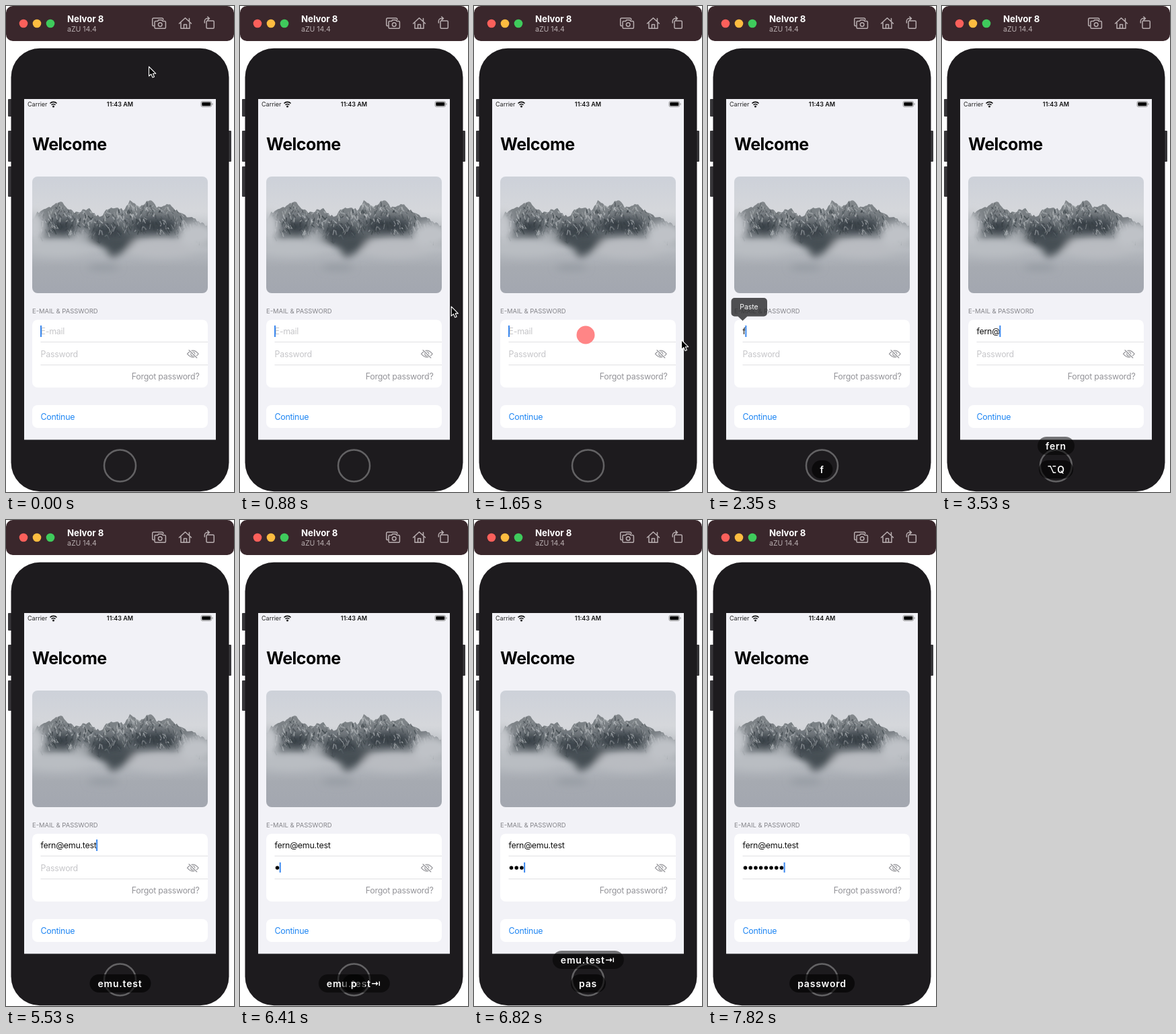
These frames come from a looping animation (339x721 px, 8000 ms). An HTML page:

```html
<!DOCTYPE html>
<html lang="en">
<head>
<meta charset="utf-8">
<title>Sign-in demo</title>
<style>
html, body { margin: 0; width: 100%; height: 100%; overflow: hidden; background: #fff; }
body { position: relative; font-family: Inter, "DejaVu Sans", sans-serif; }
svg { position: absolute; left: 0; top: 0; display: block; }
svg text { font-family: Inter, "DejaVu Sans", sans-serif; }
.row { font-size: 12.4px; letter-spacing: -.02em; }
#email {
  position: absolute; left: 51.5px; top: 474px; height: 17px; line-height: 17px;
  white-space: pre; color: #111;
}
.pill {
  position: absolute; left: 169.5px; transform: translateX(-50%);
  box-sizing: border-box; height: 27px; padding: 0 12.5px; border-radius: 13.5px;
  font-size: 14px; font-weight: 600; line-height: 27px; letter-spacing: .8px;
  white-space: pre; color: #fff;
}
#low { top: 674px; background: rgba(0,0,0,.62); }
#up { background: rgba(0,0,0,.52); }
</style>
</head>
<body>
<svg width="339" height="721" viewBox="0 0 339 721">
  <defs>
    <linearGradient id="sky" x2="0" y2="1">
      <stop offset="0" stop-color="#cdd1d9"/>
      <stop offset=".3" stop-color="#d5d7db"/>
      <stop offset=".58" stop-color="#bbbfc4"/>
      <stop offset=".78" stop-color="#a6aab1"/>
      <stop offset="1" stop-color="#a3a7b0"/>
    </linearGradient>
    <linearGradient id="rock" gradientUnits="userSpaceOnUse" x1="0" y1="288" x2="0" y2="362">
      <stop offset="0" stop-color="#84898d"/>
      <stop offset=".45" stop-color="#71777c"/>
      <stop offset=".75" stop-color="#6b7277"/>
      <stop offset="1" stop-color="#a5aaaf" stop-opacity="0"/>
    </linearGradient>
    <clipPath id="photo"><rect x="39" y="253" width="261" height="173" rx="8"/></clipPath>
    <clipPath id="ridgeClip"><use href="#ridge"/></clipPath>
    <filter id="soft" x="-60%" y="-90%" width="220%" height="280%"><feGaussianBlur stdDeviation="6"/></filter>
  </defs>

  <!-- Window bar -->
  <rect width="339" height="52" rx="10" fill="#3a272c"/>
  <circle cx="26" cy="26" r="6.3" fill="#fc605b"/>
  <circle cx="46" cy="26" r="6.3" fill="#fdbc40"/>
  <circle cx="66" cy="26" r="6.3" fill="#3fcb5c"/>
  <text x="91" y="24" font-size="13.2" font-weight="700" fill="#fff">Nelvor 8</text>
  <text x="91" y="38" font-size="10.5" fill="#b9afb1">aZU 14.4</text>
  <g fill="none" stroke="#b8aeb0" stroke-width="1.5" stroke-linejoin="round" stroke-linecap="round">
    <path d="M220 29.5h-.5a1.8 1.8 0 0 1-1.8-1.8v-8a1.8 1.8 0 0 1 1.8-1.8h12.5a1.8 1.8 0 0 1 1.8 1.8v.5"/>
    <path d="M222.5 22.5h3l1.2-1.7h5l1.2 1.7h3a1.5 1.5 0 0 1 1.5 1.5v7.8a1.5 1.5 0 0 1-1.5 1.5h-13.4a1.5 1.5 0 0 1-1.5-1.5V24a1.5 1.5 0 0 1 1.5-1.5z"/>
    <circle cx="229.2" cy="27.6" r="2.8"/>
    <path d="M257.5 26l9-8.3 9 8.3M260 24.5v8.8h13v-8.8M264.5 33v-5.5h4V33M272.5 18.5v4"/>
    <rect x="298" y="22" width="11.3" height="11.3" rx="1.5"/>
    <path d="M295.3 25v-2.5a4 4 0 0 1 4-4h3M299.8 16l2.7 2.5-2.7 2.5"/>
  </g>

  <!-- Phone body -->
  <g fill="#38373a">
    <rect x="3" y="138" width="7" height="26" rx="1"/>
    <rect x="3" y="185" width="7" height="46" rx="1"/>
    <rect x="3" y="238" width="7" height="45" rx="1"/>
    <rect x="329" y="185" width="6" height="46" rx="1"/>
  </g>
  <rect x="7.5" y="62.7" width="324" height="657.6" rx="43" fill="#1d1b1e"/>
  <circle cx="169.5" cy="682" r="23.5" fill="none" stroke="#636264" stroke-width="2.5"/>
  <rect x="27" y="138" width="285" height="505.5" fill="#f2f2f7"/>

  <!-- Status bar -->
  <text x="32" y="149" font-size="9" fill="#222">Carrier</text>
  <g fill="none" stroke="#111" stroke-width="1.6">
    <path d="M65.5 144.5a7 7 0 0 1 10 0M67.5 146.8a4.2 4.2 0 0 1 6 0"/>
    <circle cx="70.5" cy="149" r=".7"/>
  </g>
  <text id="clock" x="169.5" y="149" font-size="9" font-weight="600" text-anchor="middle" fill="#111"></text>
  <rect x="290" y="141.5" width="15.5" height="8" rx="2" fill="none" stroke="#999"/>
  <rect x="291.3" y="142.8" width="13" height="5.4" rx="1" fill="#000"/>
  <path d="M307 144v3" stroke="#999"/>

  <text x="39" y="214" font-size="25" font-weight="700" letter-spacing="-.5" fill="#000">Welcome</text>

  <!-- Mountain picture -->
  <g clip-path="url(#photo)">
    <rect x="39" y="253" width="261" height="173" fill="url(#sky)"/>
    <path id="ridge" fill="url(#rock)"/>
    <g clip-path="url(#ridgeClip)">
      <g filter="url(#soft)" fill="#3b4348">
        <ellipse cx="84" cy="328" rx="18" ry="11"/>
        <ellipse cx="150" cy="337" rx="28" ry="13"/>
        <ellipse cx="220" cy="326" rx="36" ry="12"/>
      </g>
      <g id="facets" fill="none"></g>
    </g>
    <g filter="url(#soft)">
      <ellipse cx="42" cy="328" rx="16" ry="24" fill="#c3c6cb"/>
      <ellipse cx="78" cy="358" rx="48" ry="13" fill="#b9bdc2"/>
      <ellipse cx="112" cy="341" rx="15" ry="8" fill="#a7acb1"/>
      <ellipse cx="232" cy="358" rx="52" ry="15" fill="#b9bcc1"/>
      <ellipse cx="284" cy="339" rx="28" ry="19" fill="#bfc2c7"/>
      <path d="M124 342L200 338 178 362 158 374 148 360z" fill="#454d52"/>
      <ellipse cx="145" cy="388" rx="24" ry="4" fill="#9399a0"/>
    </g>
  </g>

  <!-- Form -->
  <text x="39" y="456" font-size="9.45" fill="#85858a">E-MAIL &amp; PASSWORD</text>
  <rect x="39" y="465.5" width="261" height="100.5" rx="8" fill="#fff"/>
  <rect x="39" y="592" width="261" height="34" rx="8" fill="#fff"/>
  <path d="M51.5 498.5H300M51.5 532.5H300" stroke="#e0e0e3"/>
  <g class="row">
    <text id="hintMail" x="51.5" y="487" fill="#c6c6c9">E-mail</text>
    <text id="hintPass" x="51.5" y="520.5" fill="#c6c6c9">Password</text>
    <text x="287.5" y="553.5" text-anchor="end" fill="#95959a">Forgot password?</text>
    <text x="51.5" y="613.5" fill="#1f86f3">Continue</text>
  </g>
  <g fill="none" stroke="#929297" stroke-width="1.1" stroke-linecap="round">
    <path d="M269.5 516.2Q277.8 506 286.2 516.2 277.8 526 269.5 516.2z"/>
    <circle cx="277.8" cy="516.2" r="3"/>
    <path d="M272.5 510.5l11.5 11.5" stroke="#fff" stroke-width="3"/>
    <path d="M272 510.5l11.8 11.5"/>
  </g>
  <g id="dots" fill="#000"></g>
</svg>

<div id="email" class="row"></div>

<svg width="339" height="721" viewBox="0 0 339 721">
  <rect id="caret" width="2" fill="#3a88ef"/>
  <g id="paste">
    <path d="M39.5 433H83a5 5 0 0 1 5 5V455.5a5 5 0 0 1-5 5H58.5L51.5 467 44.5 460.5H39.5a5 5 0 0 1-5-5V438a5 5 0 0 1 5-5z" fill="#2c2c2e"/>
    <text x="61" y="450.3" font-size="10.4" text-anchor="middle" fill="#fff">Paste</text>
  </g>
  <circle id="touch" cx="166" cy="488" r="13.5" fill="#ff8586"/>
  <path id="mouse" d="M0 0V14L3.3 11 5.5 16 8 15 5.9 10.2H10.2z" fill="#000" stroke="#fff" stroke-width="1.1" stroke-linejoin="round"/>
</svg>

<div id="up" class="pill"></div>
<div id="low" class="pill"></div>

<script>
const LOOP = 8000;
const MAIL = "fern@emu.test";
const $ = id => document.getElementById(id);

// time, letters in e-mail, letters in password, lower key label, upper key label
const STEPS = [
  [0, 0, 0, "", ""],
  [2240, 1, 0, "f", ""],
  [2470, 2, 0, "fe", ""],
  [2650, 3, 0, "fer", ""],
  [2820, 4, 0, "fern", ""],
  [3350, 5, 0, "⌥Q", "fern"],
  [4000, 6, 0, "e", "⌥Q"],
  [4120, 7, 0, "em", "⌥Q"],
  [4350, 8, 0, "emu", "⌥Q"],
  [4590, 9, 0, "emu.", "⌥Q"],
  [4820, 10, 0, "emu.t", "⌥Q"],
  [5000, 11, 0, "emu.te", "⌥Q"],
  [5240, 12, 0, "emu.tes", "⌥Q"],
  [5410, 13, 0, "emu.test", "⌥Q"],
  [5530, 13, 0, "emu.test", ""],
  [5820, 13, 0, "emu.test⇥", ""],
  [6410, 13, 1, "p", "emu.test⇥"],
  [6590, 13, 2, "pa", "emu.test⇥"],
  [6760, 13, 3, "pas", "emu.test⇥"],
  [6940, 13, 4, "pass", "emu.test⇥"],
  [7180, 13, 5, "passw", "emu.test⇥"],
  [7350, 13, 6, "passwo", "emu.test⇥"],
  [7470, 13, 7, "passwor", "emu.test⇥"],
  [7650, 13, 8, "password", "emu.test⇥"],
  [7820, 13, 8, "password", ""]
];
const RISES = [3350, 4000, 6410];
const TAB = 5820;

const MOUSE_X = [[0, 212.5], [60, 212.5], [350, 315], [530, 315], [1000, 314], [1150, 311], [1290, 308.5]];
const MOUSE_Y = [[0, 90], [60, 90], [350, 267], [530, 267], [1000, 480], [1150, 499], [1290, 495.5]];
const BLINK = [[0, 1], [60, 1], [240, 0], [530, 0], [650, 1], [1000, 1], [1180, 0], [1350, 0], [1470, 1]];
const TOUCH = [[1350, 0], [1470, 1], [1700, 1], [1880, 0]];
const PASTE = [[1880, 0], [2120, .92], [2300, .92], [2350, .82], [2470, 0]];

const PEAKS = [
  [39, 318], [48, 306], [58, 301], [68, 298], [76, 291], [83, 292], [94, 302], [104, 307],
  [122, 301], [138, 312], [157, 298], [174, 302], [186, 289], [198, 297], [213, 288],
  [226, 299], [242, 295], [256, 304], [272, 313], [300, 325]
];

const smooth = k => k * k * (3 - 2 * k);

function track(keys, t) {
  if (t <= keys[0][0]) return keys[0][1];
  for (let i = 1; i < keys.length; i++) {
    const [t0, a] = keys[i - 1], [t1, b] = keys[i];
    if (t < t1) return a + (b - a) * smooth((t - t0) / (t1 - t0));
  }
  return keys[keys.length - 1][1];
}

function make(parent, tag, attrs) {
  const el = document.createElementNS("http://www.w3.org/2000/svg", tag);
  for (const key in attrs) el.setAttribute(key, attrs[key]);
  parent.appendChild(el);
  return el;
}

let seed = 11;
const rnd = () => (seed = (seed * 16807) % 2147483647) / 2147483647;

// Jagged skyline
let skyline = "M39 375";
for (let x = 39; x <= 300; x += 2.5) skyline += `L${x} ${track(PEAKS, x) + (rnd() - .5) * 4}`;
$("ridge").setAttribute("d", skyline + "L300 375z");

// Snow near the crest, shadow further down
for (let i = 0; i < 520; i++) {
  const x = 48 + rnd() * 240, depth = rnd() * 38;
  const snow = rnd() < .68 - depth / 70;
  make($("facets"), "path", {
    d: `M${x} ${track(PEAKS, x) + depth}l${(rnd() - .4) * 9} ${2 + rnd() * 6}`,
    stroke: snow ? "#bcc0c3" : "#343c41",
    "stroke-width": .6 + rnd() * 1.4,
    opacity: .3 + rnd() * .4
  });
}

const dots = Array.from({ length: 8 }, (_, i) =>
  make($("dots"), "circle", { cx: 55.5 + 7.7 * i, cy: 516, r: 2.8 }));

function setPill(el, label) {
  if (el.textContent !== label) el.textContent = label;
  el.style.visibility = label ? "visible" : "hidden";
}

function render(t) {
  const [, mail, pass, low, up] = STEPS.findLast(s => s[0] <= t);
  const inPass = t >= TAB;
  const email = $("email");
  email.textContent = MAIL.slice(0, mail);

  $("hintMail").style.opacity = mail ? 0 : 1;
  $("hintPass").style.opacity = pass ? 0 : 1;
  dots.forEach((d, i) => d.style.opacity = i < pass ? 1 : 0);

  const caret = $("caret");
  const end = inPass ? 7.7 * pass : email.getBoundingClientRect().width;
  caret.setAttribute("x", 51 + end);
  caret.setAttribute("y", inPass ? 508 : 474);
  caret.setAttribute("height", inPass ? 15 : 17);
  caret.style.opacity = track(BLINK, t);

  const mouse = $("mouse");
  mouse.setAttribute("transform", `translate(${track(MOUSE_X, t)} ${track(MOUSE_Y, t)})`);
  mouse.style.opacity = t < 2120 ? 1 : 0;
  $("touch").style.opacity = track(TOUCH, t);
  $("paste").style.opacity = track(PASTE, t);

  $("clock").textContent = t < 7000 ? "11:43 AM" : "11:44 AM";

  setPill($("low"), low);
  setPill($("up"), up);
  const rise = RISES.findLast(s => s <= t) || 0;
  $("up").style.top = track([[rise, 674], [rise + 110, 639]], t) + "px";
}

const start = performance.now();
function tick() {
  render((performance.now() - start) % LOOP);
  requestAnimationFrame(tick);
}
tick();
</script>
</body>
</html>
```
